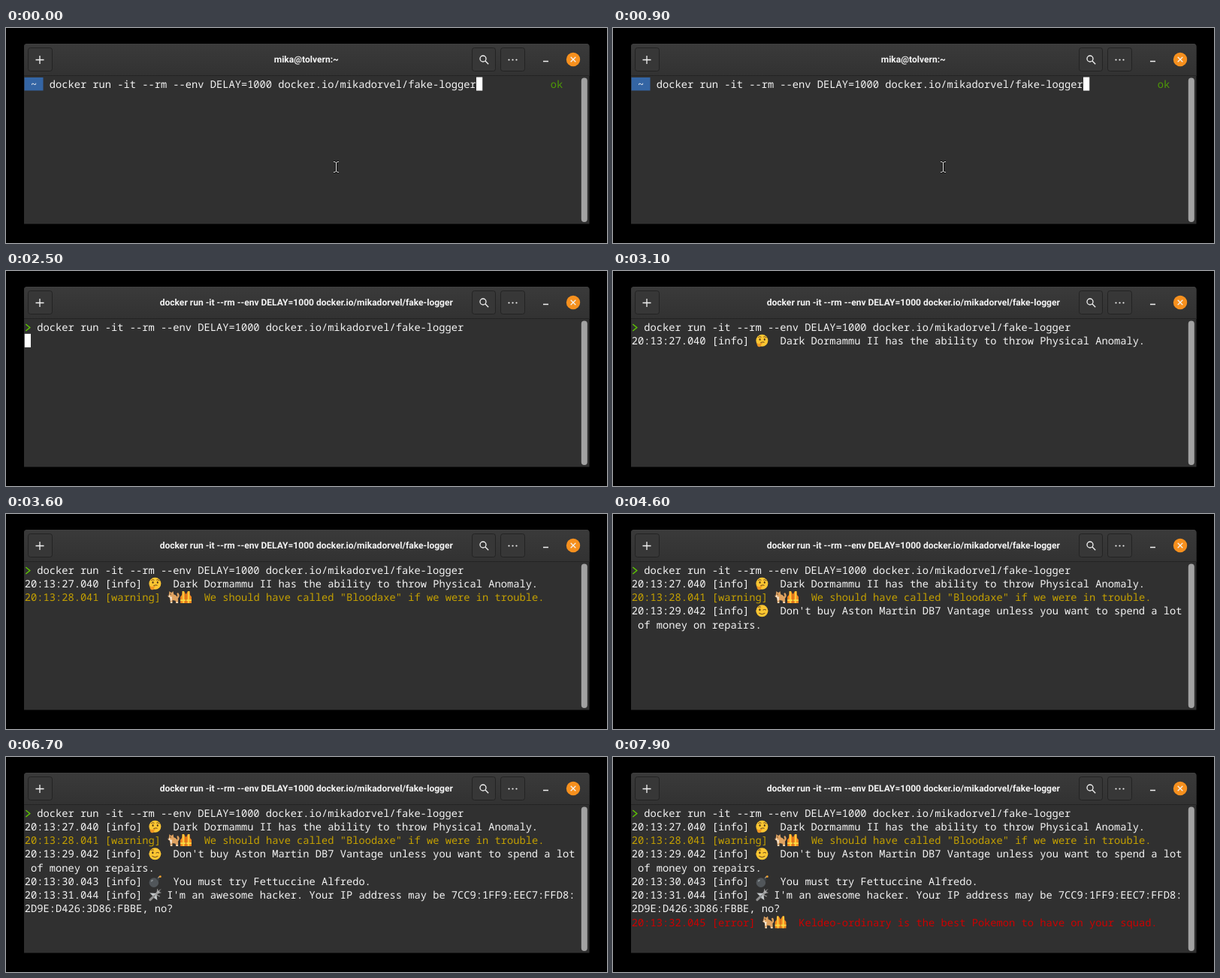
An HTML page that plays this animation: 800 px wide and 287 px high, repeating every 8 s.

```html
<!DOCTYPE html>
<html lang="en">
<head>
<meta charset="utf-8">
<title>Terminal log</title>
<style>
  html, body { margin: 0; width: 100%; height: 100%; overflow: hidden; background: #000; }
  svg { display: block; }
  text { white-space: pre; text-rendering: geometricPrecision; }
  #screen text { font: 13.727px "Noto Sans Mono", "DejaVu Sans Mono", monospace; font-variant-ligatures: none; }
  #title { font: 700 12.06px Roboto, "Open Sans", sans-serif; fill: #f4f4f4; text-anchor: middle; }
  .button rect { fill: #373737; stroke: #232323; }
  .line { fill: none; stroke: #f2f2f2; stroke-width: 1.3; }
</style>
</head>
<body>
<svg width="800" height="287" viewBox="0 0 800 287">
  <defs>
    <linearGradient id="bar" x2="0" y2="1">
      <stop offset="0" stop-color="#3a3a3a"/><stop offset="1" stop-color="#323232"/>
    </linearGradient>
    <!-- emoji, 16 x 16, centred on the origin -->
    <g id="think">
      <circle r="8" fill="#fcc632"/>
      <path d="M-5-4.2q2-1.8 4-.3M2-4.8q2-1 4 1M-2 2.8q3-1.4 5.2-.4" fill="none" stroke="#65441c"/>
      <ellipse cx="-2.8" cy="-1.4" rx="1" ry="1.4" fill="#4a3418"/>
      <ellipse cx="3.4" cy="-1.4" rx="1" ry="1.4" fill="#4a3418"/>
      <path d="M-7 3.4q1.4-1 2 1.2l4.6-1.4q1.5.2.4 1.5l-1.6.9q1 2-1.4 2.8-3.6.8-4-5z" fill="#ee9623"/>
    </g>
    <g id="wink">
      <circle r="8" fill="#fcc632"/>
      <ellipse cx="-3" cy="-1.6" rx="1.1" ry="1.6" fill="#4a3418"/>
      <path d="M-5-4.8q1.8-1.4 3.4-.3M1.2-1.2q2.2-1.5 4.4 0M-4 3q4 3 8 0" fill="none" stroke="#65441c"/>
    </g>
    <g id="bomb">
      <circle cx="-1.5" cy="1.8" r="6.3" fill="#51565a"/>
      <path d="M1.2-3.4l2-2 3 3-2 2z" fill="#3b4043"/>
      <path d="M4.4-4q.5-2.6 2.5-2.2" fill="none" stroke="#b4a58c" stroke-width="1.2"/>
      <circle cx="7" cy="-6.2" r="1.4" fill="#f4a32c"/>
      <ellipse cx="-4" cy="-.8" rx="1.7" ry="1" fill="#8a9195" transform="rotate(-40 -4 -.8)"/>
    </g>
    <g id="bug">
      <path d="M-6.5 6.5L4-3.5" stroke="#909090" stroke-width="3" stroke-linecap="round"/>
      <path d="M2-2L-7-2.5-3 1.5zM2-1L3 7-1.5 4z" fill="#c4c8ca"/>
      <circle cx="4.2" cy="-3.8" r="2" fill="#a8a8a8"/>
      <path d="M5-5l2.5-2.5M3-5l.5-3M5.5-3l2.5 0M2 0l4.5 2" fill="none" stroke="#aaa"/>
    </g>
    <g id="dog">
      <path d="M3.6 2Q8-1 5.6-4.6" fill="none" stroke="#dfa260" stroke-width="2.4" stroke-linecap="round"/>
      <path d="M-5.6-8l1.8 1.6h1.6L-.6-8l.8 4.2Q5.5-2 6 3v5H3.2L2.6 4.6-1.4 4-1.8 8h-2.4l-.6-7.4q-2.8-.6-3-2.6l1.6-1.6z" fill="#dfa260"/>
      <path d="M-7.6-2l2.4-1 1.2 2.6 2-.4L-2.4 4-3.8 5.4-4.8.6zM-4 6.5h2.2V8H-4zM3.4 6.5H6V8H3.4z" fill="#f6e4cc"/>
      <circle cx="-7" cy="-2.4" r=".8" fill="#3a2a20"/>
      <circle cx="-4" cy="-4.2" r=".7" fill="#3a2a20"/>
    </g>
    <g id="vest">
      <path d="M-5-8h2.6L0-3.6 2.4-8H5l.4 5L7.4-.6V8H-7.4V-.6l2-2.4z" fill="#f68a1f"/>
      <path d="M-3.8-8l.4 16M3.8-8l-.4 16M-7.4 4H7.4" fill="none" stroke="#fbdc45" stroke-width="1.6"/>
      <path d="M0-3.6V8" stroke="#a8541a" stroke-width=".8"/>
    </g>
  </defs>

  <path d="M24 261.5V25q0-4 4-4H772.5q4 0 4 4V261.5z" fill="#303030"/>
  <path d="M24 64V25q0-4 4-4H772.5q4 0 4 4V64z" fill="url(#bar)"/>
  <path d="M27 21.5H774" stroke="#404040"/>
  <path d="M24 63.5H776.5" stroke="#242424"/>
  <g class="button">
    <rect x="29.5" y="26.5" width="32" height="31" rx="3"/>
    <rect x="620.5" y="26.5" width="31" height="31" rx="3"/>
    <rect x="658.5" y="26.5" width="32" height="31" rx="3"/>
  </g>
  <g class="line">
    <path d="M39.5 42.5H50.5M45 37V48"/>
    <circle cx="635" cy="41" r="4"/>
    <path d="M638 44l4.2 4.2M715 44.5H722"/>
  </g>
  <g fill="#f2f2f2">
    <circle cx="669.5" cy="42.5" r="1.1"/><circle cx="674.5" cy="42.5" r="1.1"/><circle cx="679.5" cy="42.5" r="1.1"/>
  </g>
  <circle cx="755" cy="42" r="9.2" fill="#f6901e"/>
  <path d="M751.7 38.7l6.6 6.6m0-6.6l-6.6 6.6" class="line"/>
  <text id="title" x="399.8" y="45.6"></text>

  <g id="screen"></g>
  <rect id="cursor" width="8.2" height="18" fill="#fff"/>
  <g id="pointer" fill="none">
    <path d="M436 178.5q3 0 3.5 1.5 .5-1.5 3.5-1.5M439.5 180V191M436 192.5q3 0 3.5-1.5 .5 1.5 3.5 1.5" stroke="#111" stroke-width="3"/>
    <path d="M436 178.5q3 0 3.5 1.5 .5-1.5 3.5-1.5M439.5 180V191M436 192.5q3 0 3.5-1.5 .5 1.5 3.5 1.5" stroke="#eee"/>
  </g>
  <rect x="765.8" y="66.5" width="8" height="192.5" rx="4" fill="#a2a2a2"/>
</svg>
<script>
const LOOP = 8000, ENTER = 1300, BLINK = 600;
const LEFT = 24.8, TOP = 65.6, COL = 8.236, ROW = 18.25;
const WHITE = "#f4f4f4", YELLOW = "#c4a000", RED = "#cc0000", GREEN = "#4e9a06";
const command = "docker run -it --rm --env DELAY=1000 docker.io/mikadorvel/fake-logger";

const $ = id => document.getElementById(id);
const colX = c => LEFT + c * COL;
const rowY = r => TOP + r * ROW;
const label = (row, col, str, fill = WHITE) =>
  `<text x="${colX(col)}" y="${rowY(row) + 14}" fill="${fill}">${str}</text>`;
const icon = (row, col, name) =>
  `<use href="#${name}" x="${colX(col + 1) + 0.6}" y="${rowY(row) + 9}"/>`;

// One log entry: stamp, icons two columns wide each, message, wrapped rest.
function entry(at, row, stamp, icons, gap, msg, fill, rest = "") {
  const start = stamp.length + 1;
  const body = label(row, 0, stamp, fill)
    + icons.map((name, i) => icon(row, start + 2 * i, name)).join("")
    + label(row, start + 2 * icons.length + gap, msg, fill)
    + (rest && label(row + 1, 0, rest, fill));
  return { at, next: row + (rest ? 2 : 1), body };
}

const log = [
  entry(2600, 1, "20:13:27.040 [info]", ["think"], 2,
    "Dark Dormammu II has the ability to throw Physical Anomaly.", WHITE),
  entry(3600, 2, "20:13:28.041 [warning]", ["dog", "vest"], 2,
    'We should have called "Bloodaxe" if we were in trouble.', YELLOW),
  entry(4600, 3, "20:13:29.042 [info]", ["wink"], 2,
    "Don't buy Aston Martin DB7 Vantage unless you want to spend a lot", WHITE,
    " of money on repairs."),
  entry(5600, 5, "20:13:30.043 [info]", ["bomb"], 2,
    "You must try Fettuccine Alfredo.", WHITE),
  entry(6600, 6, "20:13:31.044 [info]", ["bug"], 1,
    "I'm an awesome hacker. Your IP address may be 7CC9:1FF9:EEC7:FFD8:", WHITE,
    "2D9E:D426:3D86:FBBE, no?"),
  entry(7700, 8, "20:13:32.045 [error]", ["dog", "vest"], 2,
    "Keldeo-ordinary is the best Pokemon to have on your squad.", RED)
];

const prompt = `<rect x="24.5" y="66" width="25" height="17.5" fill="#3465a4"/>`
  + label(0, 1, "~") + label(0, 4, command) + label(0, 85, "ok", GREEN);
const running = `<path d="M26.3 71L31.8 75.5 26.3 80" fill="none" stroke="#5fc800" stroke-width="1.4"/>`
  + label(0, 2, command);

let shown = "";
function render(t) {
  const typed = t < ENTER;
  const lines = log.filter(e => t >= e.at);
  const state = typed + ":" + lines.length;
  if (state !== shown) {
    shown = state;
    $("title").textContent = typed ? "mika@tolvern:~" : command;
    $("screen").innerHTML = typed ? prompt : running + lines.map(e => e.body).join("");
    $("pointer").style.display = typed ? "" : "none";
    const row = typed ? 0 : lines.length ? lines[lines.length - 1].next : 1;
    $("cursor").setAttribute("x", colX(typed ? 4 + command.length : 0));
    $("cursor").setAttribute("y", rowY(row));
  }
  // The blink starts over when the command is entered.
  const phase = Math.floor((typed ? t + 300 : t - ENTER) / BLINK);
  $("cursor").style.display = phase % 2 ? "none" : "";
}

const begin = performance.now();
function tick() {
  render((performance.now() - begin) % LOOP);
  requestAnimationFrame(tick);
}
tick();
</script>
</body>
</html>
```
